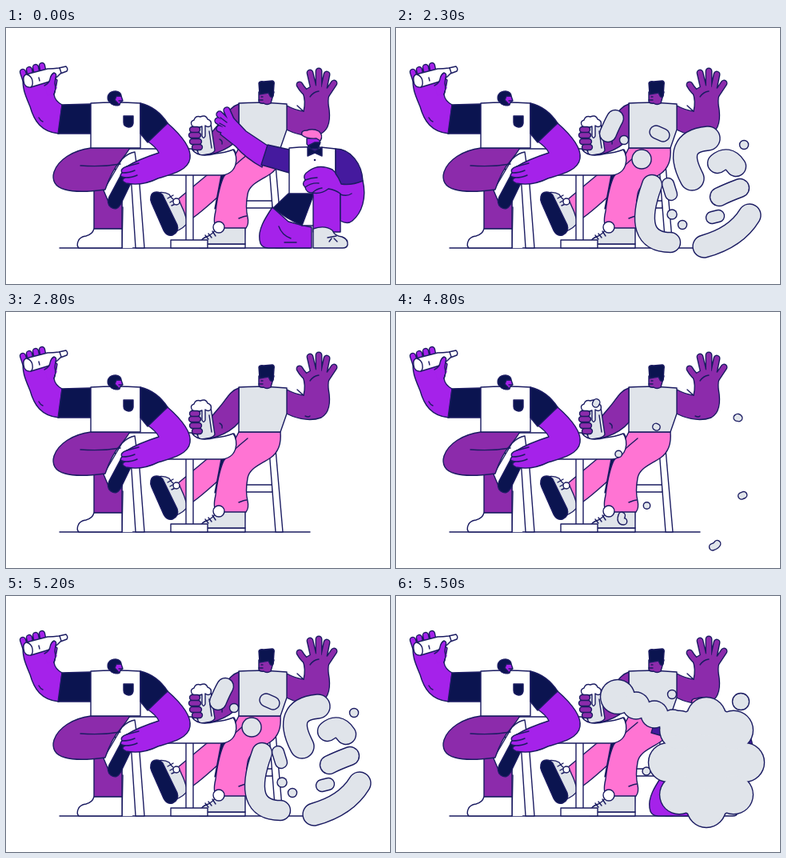
Animation of 480 by 320 pixels, one loop 5600 ms. Source, as an HTML page with a canvas:

```html
<!DOCTYPE html>
<html lang="en">
<head>
<meta charset="utf-8">
<title>Friends at a table</title>
<style>
html, body { margin: 0; width: 100%; height: 100%; overflow: hidden; background: #fff; }
canvas { display: block; width: 480px; height: 320px; }
</style>
</head>
<body>
<canvas id="stage"></canvas>
<script>
const canvas = document.getElementById('stage');
const ctx = canvas.getContext('2d');
const dpr = window.devicePixelRatio || 1;
canvas.width = 480 * dpr;
canvas.height = 320 * dpr;

const LINE = '#1b1c62', NAVY = '#0b1450', VIOLET = '#a522ea', PLUM = '#8c2bab';
const PINK = '#ff74d3', GREY = '#e0e4ea', INDIGO = '#451a9e', WHITE = '#fff';
const LW = 1.4, LOOP = 5600, STEP = 100, LAST = 7;

function shape(d, fill, line = LINE) {
  const p = new Path2D(d);
  if (fill) { ctx.fillStyle = fill; ctx.fill(p); }
  if (line) { ctx.strokeStyle = line; ctx.lineWidth = LW; ctx.stroke(p); }
}

const stroke = d => shape(d, null);

function disc(x, y, r, fill) {
  shape(`M${x - r},${y}a${r},${r} 0 1 0 ${2 * r},0a${r},${r} 0 1 0 ${-2 * r},0Z`, fill);
}

function bars(d, width, color) {
  ctx.lineWidth = width;
  ctx.strokeStyle = color;
  ctx.stroke(new Path2D(d));
}

// Finger outlines, then the palm, then finger fills that hide the seam
function hand(digits, width, color, palm) {
  bars(digits, width + LW, LINE);
  if (palm) shape(palm, color);
  bars(digits, width - LW, color);
}

function stools() {
  shape('M145,217H161V224H145Z', WHITE);
  shape('M146,180L145,275H158L160,217Z', WHITE, null);
  stroke('M146,224L145,275');
  shape('M156,183L162,275H173L166,183Z', WHITE);
  shape('M299,216H333V225H299Z', WHITE);
  stroke('M300,205L298,275');
  shape('M328,160L337,275H346L336,160Z', WHITE);
}

function seatedRight() {
  // far leg and raised foot
  shape('M285,152L251,184L215,214Q220,228 227,241Q234,239 265,211L300,178Z', PINK);
  shape('M188,206Q198,204 204,208Q208,216 217,217Q223,229 227,243Q222,251 212,254Z', GREY);
  shape('M181,211Q182,205 188,205Q193,205 196,209L214,246Q217,255 208,259Q201,261 197,253L182,219Q180,215 181,211Z', NAVY);
  stroke('M202,213L209,209M205,218L212,214M207,222L214,219');
  disc(213, 217, 4, WHITE);
  shape('M269,184L261,226L271,209L280,184Z', NAVY);
  // near leg and shoe
  shape('M242,270H299V275H242Z', WHITE);
  shape('M242,270Q243,263 253,260Q260,256 264,249H299V270Z', GREY);
  stroke('M249,259L253,264M253,257L257,262M258,254L262,260');
  shape('M291,150H343Q345,172 331,182C318,191 304,195 302,208Q299,224 302,236Q304,245 300,250H264Q258,246 262,229Q266,197 274,182Q283,166 291,150Z', PINK);
  stroke('M302,158Q281,175 271,187M291,238Q298,235 301,235');
  disc(266, 249, 7, WHITE);
  // raised arm
  hand('M380,84Q372,80 367,71M386,82L380,56M391,82V54M396,82L401,58M400,84L410,69', 7.5, PLUM,
    'M351,97Q362,103 372,104Q375,91 371,81L376,76L385,71L402,75L406,78Q402,86 403,96C406,112 405,126 394,132C378,138 359,132 347,125Z');
  stroke('M380,86Q384,80 391,79M374,130Q378,132 380,130M364,97Q368,101 372,104');
  // body and head
  shape('M291,94Q320,92 351,95V127L343,150H291Z', GREY);
  shape('M316,80V92Q318,95 322,94Q326,97 331,94L335,80Z', PLUM);
  shape('M316,69Q317,66 322,67L333,66Q336,67 335,71L334,85Q332,88 330,85L328,81L317,83Z', NAVY);
  stroke('M316,90H321M319,86H321');
  // arm reaching the glass
  shape('M291,95C279,99 276,109 266,120L255,133L239,139V154Q252,160 263,156Q281,150 291,138Z', PLUM);
  stroke('M267,139Q271,141 270,145');
}

function table() {
  shape('M225,183H234V266H225Z', WHITE);
  shape('M206,265H252V275H206Z', WHITE);
  shape('M151,151H232Q240,163 262,157Q274,156 284,152C291,161 290,184 267,184H160C141,184 134,178 135,169Q138,153 151,151Z', WHITE);
}

function beer() {
  shape('M235,121L256,119L261,153Q259,157 251,158Q242,160 240,156Z', GREY);
  stroke('M254,129L257,150');
  shape('M233,123Q229,117 235,115Q237,109 243,111Q250,108 252,114Q258,116 256,122Q253,125 249,122V135Q247,140 245,135V123Q239,126 233,123Z', WHITE);
  hand('M233,127H239M232,134H240M233,142H241M236,149H242', 7, PLUM);
}

function seatedLeft() {
  // standing leg
  shape('M110,195H145V251H110Z', PLUM);
  shape('M110,251H145V275H91Q88,272 90,267Q92,261 100,260Q108,258 110,251Z', WHITE);
  // crossed leg
  shape('M145,164Q153,156 161,155L165,184L153,195L130,222L122,203Z', WHITE);
  shape('M154,176Q160,180 158,190L143,221Q138,229 131,224Q125,219 129,211L145,181Q149,173 154,176Z', NAVY);
  shape('M106,150H155Q150,158 144,165Q132,178 124,202C109,204 88,206 74,202C61,199 57,190 60,180C65,165 83,153 106,150Z', PLUM);
  stroke('M93,172Q120,174 143,170');
  // raised arm and bottle
  hand('M26,70L21,55M32,66L29,52M40,64L37,49M48,62L45,47', 7, VIOLET,
    'M70,96Q61,91 60,83Q63,74 64,65L55,58L22,60C19,74 25,86 30,98C35,116 44,130 66,132Z');
  shape('M25,58L52,51Q59,51 66,50L75,48Q78,51 76,54L68,57Q61,65 51,68L31,74Q23,75 22,66Q21,60 25,58Z', WHITE);
  stroke('M26,58Q32,60 33,66Q34,72 31,74M67,50L69,56M41,62L42,66');
  shape('M48,72L55,66Q55,58 60,56Q64,57 62,62L61,70L64,75L52,85Z', VIOLET, null);
  stroke('M48,72Q54,69 55,64Q56,58 60,56Q64,57 62,62L61,69Q63,77 60,83M41,112Q43,116 46,117');
  shape('M106,95L70,96L65,132H106Z', NAVY);
  // body and head
  shape('M106,94Q137,92 168,94V150H106Z', WHITE);
  shape('M147,110H159V119Q158,124 153,124Q147,123 147,118Z', NAVY);
  shape('M133,85H144L146,91L143,93L142,96Q137,98 133,95Z', VIOLET);
  shape('M128,91C125,84 130,79 137,79Q144,80 144,85H138L136,90L141,95Q137,98 132,95Z', NAVY);
  stroke('M141,91H145');
  // arm on the table
  shape('M202,119C218,133 232,149 230,163C228,178 207,183 190,188C178,194 165,197 150,194Q142,190 149,187Q140,186 145,181Q142,176 151,173Q166,164 191,156Q188,149 176,141Z', VIOLET);
  stroke('M149,187Q158,187 164,184M145,181Q155,181 161,178M151,173L166,169');
  shape('M168,94Q189,99 202,119L177,143L168,132Z', NAVY);
}

function pointingArm() {
  hand('M284,121L276,103M280,121L267,108M278,124L265,116M278,130L267,126', 8, VIOLET,
    'M284,112L300,129L327,147L320,174Q300,163 287,148L268,133L273,115Z');
  stroke('M267,119L274,123M268,112L276,118');
}

function kneeler() {
  shape('M327,146L354,152V181L319,171Z', INDIGO);
  // back leg, body and shorts
  shape('M333,224C323,239 315,252 317,265Q318,275 328,275H382V249Q366,246 353,242Z', VIOLET);
  stroke('M341,248Q345,259 356,263M348,268H363');
  shape('M354,150Q383,147 412,151V247H370L354,210Z', WHITE);
  shape('M353,207H385L370,247Q350,238 334,225Z', NAVY);
  // head
  shape('M376,138V145Q379,150 383,153H390L393,137Z', VIOLET);
  shape('M378,147L386,143H393L390,151H381Z', NAVY);
  shape('M370,134Q368,128 376,128Q384,125 391,129Q397,134 393,141L388,138Q377,139 370,134Z', PINK);
  shape('M386,154L377,149V160L386,156L395,160V149Z', NAVY);
  disc(386, 165, 0.6, NAVY);
  // shin and shoe
  shape('M384,210Q382,195 399,194Q417,195 418,209V255H384Z', VIOLET);
  shape('M384,251Q399,246 408,253Q411,260 420,261Q428,264 427,271Q426,275 421,275H384Z', GREY);
  stroke('M402,262L413,260M407,263L404,267M410,263L414,267');
  // folded arm
  shape('M412,181L446,191C451,212 445,231 433,241Q427,246 418,241V207Q411,202 403,201Q394,208 383,206Q375,206 374,199Q369,195 374,190Q370,184 378,179Q391,169 408,177Z', VIOLET);
  stroke('M374,190Q382,187 389,187M374,199Q382,193 391,194M383,206Q388,201 395,200M418,208Q426,211 432,207');
  shape('M412,151C431,151 445,170 446,191Q432,197 419,195Q416,187 412,182Z', INDIGO);
}

// Draws every part in line colour, then again smaller in grey, so overlaps merge
function merged(drawAll) {
  for (const [grow, color] of [[LW, LINE], [-LW, GREY]]) {
    ctx.strokeStyle = color;
    drawAll(grow);
  }
}

// Strokes a path of the given thickness, shrunk towards a point
function blob(d, size, scale = 1, x = 0, y = 0) {
  if (size <= 0) return;
  ctx.save();
  ctx.translate(x, y);
  ctx.scale(scale, scale);
  ctx.translate(-x, -y);
  ctx.lineWidth = size / scale;
  ctx.stroke(new Path2D(d));
  ctx.restore();
}

const dot = (x, y, size) => blob(`M${x},${y}h.01`, size);

function cloud(grow) {
  blob('M388,185V231', 95 + grow);
  for (let i = 0; i < 8; i++) {
    const a = i * Math.PI / 4;
    dot(388 + 48 * Math.cos(a), 208 + 57 * Math.sin(a), 49 + grow);
  }
  for (let i = 0; i < 4; i++) dot(277 + 23 * i, 126 + 11 * i, (i ? 34 : 43) + grow);
  dot(345, 123, 11 + grow);
  dot(431, 132, 21 + grow);
  dot(313, 219, 10 + grow);
}

// swell: puffs still fat from the cloud; fade: 0 lumps, 1 crumbs
function puffs(grow, swell, fade) {
  const keep = (d, size, x, y) =>
    blob(d, size + (8.5 - size) * fade + 26 * swell + grow, 1 - 0.9 * fade, x, y);
  const lose = (d, size) => {
    const s = size * (1 - fade) + 26 * swell;
    if (s > 2) blob(d, s + grow);
  };
  keep('M274,113Q270,120 265,132', 21, 248, 113);
  keep('M325,130L334,134', 16, 325, 145);
  keep('M307,164h.1', 24, 275, 179);
  keep('M402,169Q415,158 425,173', 25, 429, 128);
  keep('M404,211Q414,206 430,200', 23, 435, 232);
  keep('M442,234Q425,262 385,273', 28, 397, 296);
  keep('M320,196Q294,268 343,268', 25, 278, 261);
  keep('M345,233h.1', 12, 310, 243);
  lose('M390,138Q346,142 370,188', 30);
  lose('M340,195L344,208', 15);
  lose('M395,237L403,235', 15);
  lose('M285,140h.1M435,146h.1M358,246h.1', 11);
}

function smoke(k) {
  if (k === 0) return merged(cloud);
  const swell = Math.max(0, 1 - k / 3), fade = Math.max(0, (k - 3) / (LAST - 3));
  merged(grow => puffs(grow, swell, fade));
}

function draw(t) {
  ctx.setTransform(dpr, 0, 0, dpr, 0, 0);
  ctx.lineCap = ctx.lineJoin = 'round';
  ctx.fillStyle = WHITE;
  ctx.fillRect(0, 0, 480, 320);
  stroke('M67,275H380');
  stools();
  seatedRight();
  table();
  seatedLeft();
  beer();

  // the smoke plays forwards, then in reverse
  const out = Math.floor((t - 2000) / STEP);
  const back = LAST - Math.floor((t - 4800) / STEP);
  const k = t < 4800 ? out : back;
  if (t < 2000) pointingArm();
  if (k <= 0) kneeler();
  if (t >= 2000 && k <= LAST) smoke(k);
}

const start = performance.now();
function tick() {
  draw((performance.now() - start) % LOOP);
  requestAnimationFrame(tick);
}
tick();
</script>
</body>
</html>
```
